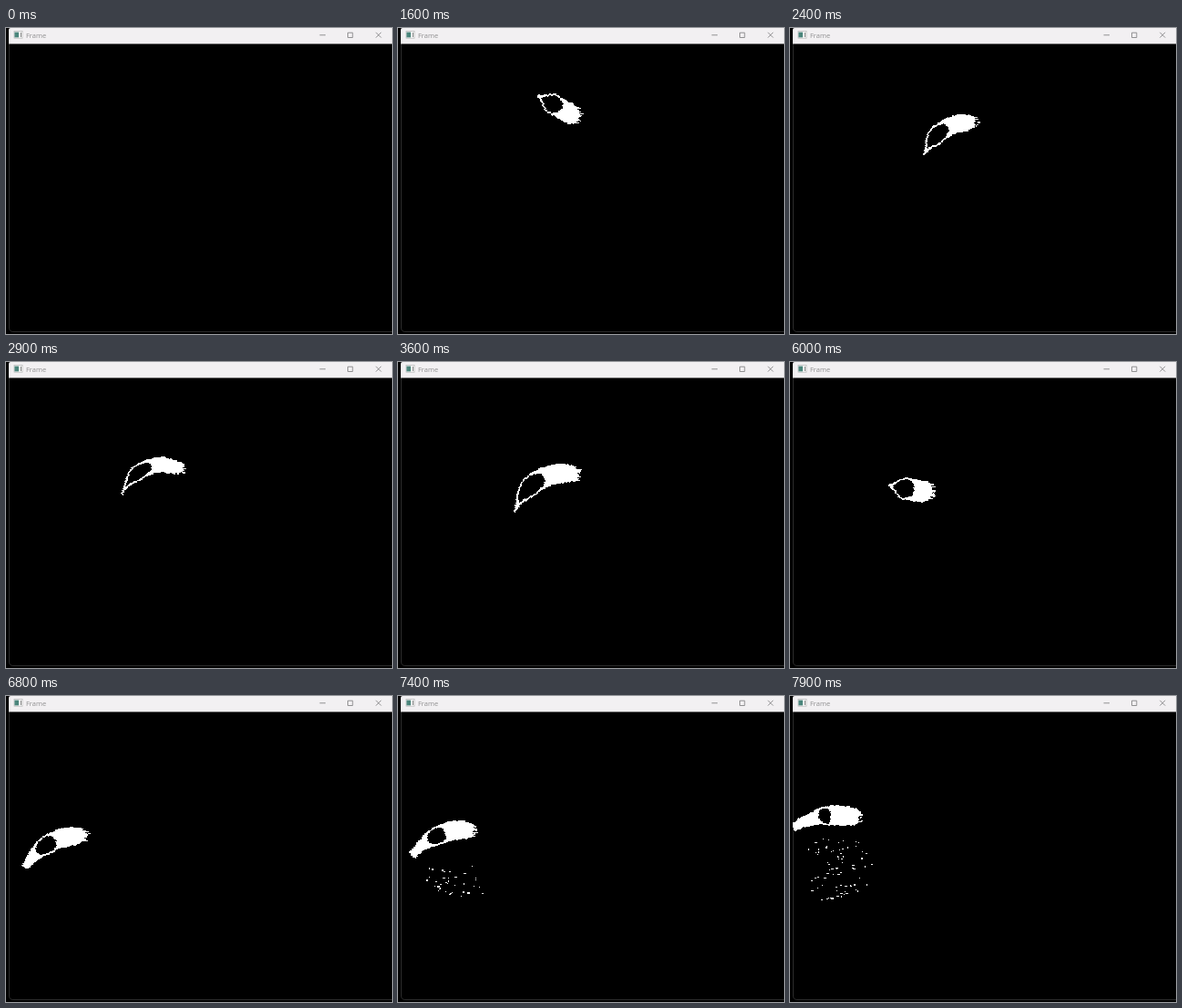
An HTML page with a canvas that plays this animation: 424 px wide and 337 px high, repeating every 8000 ms.

```html
<!DOCTYPE html>
<html lang="en">
<head>
<meta charset="utf-8">
<title>Frame</title>
<style>
  html, body { margin: 0; width: 100%; height: 100%; overflow: hidden; background: #000; }
  svg, canvas { position: absolute; left: 0; top: 0; display: block; }
  text { font: 7.5px "Open Sans", "Noto Sans", sans-serif; fill: #8f8f90; }
  .glyph { fill: none; stroke: #808081; stroke-width: .85; }
</style>
</head>
<body>
<svg width="424" height="337" viewBox="0 0 424 337">
  <path d="M3.5 17V330q0 4.5 4.5 4.5H424" fill="none" stroke="#2c2c2c"/>
  <path d="M3 17.6V2q0-2 2-2H424V17.6Z" fill="#f2f0f2"/>
  <rect x="9" y="3.6" width="9" height="7.6" fill="#f8f8f8" stroke="#b4b6b6" stroke-width=".7"/>
  <rect x="9.4" y="4.6" width="4.6" height="5.8" fill="#4b867c"/>
  <rect x="16" y="5" width="1" height="5" fill="#888"/>
  <text x="22" y="10.6">Frame</text>
  <path class="glyph" d="M344.5 7.8H351M375.5 5.2H380.8V10.5H375.5ZM406.3 4.8L412.1 10.6M412.1 4.8L406.3 10.6"/>
</svg>
<canvas id="mask" width="424" height="337"></canvas>
<script>
const ctx = document.getElementById('mask').getContext('2d');
const LOOP = 8000, STEP = 100, FIRST = 7, SAMPLES = 24;
const held = new Set([9, 21, 23, 43, 44, 49, 57]);

// A comet on a bent spine: tail and head points, bend, half width,
// and neck, the share of the spine over which it widens.
const pose = (step, tx, ty, hx, hy, bend, width, neck = .35) =>
  ({ step, tx, ty, hx, hy, bend, width, neck });
const poses = [
  pose(7, 178, 76, 238, 100, 4, 13),
  pose(16, 153, 74, 199, 100, 0, 11),
  pose(22, 149, 140, 205, 103, 24, 10),
  pose(29, 127, 146, 195, 119, 35, 8.5),
  pose(36, 128, 165, 199, 124, 34, 11),
  pose(45, 152, 136, 195, 125, 9, 11, .3),
  pose(53, 130, 166, 208, 118, 34, 12),
  pose(60, 108, 135, 157, 143, -3, 12),
  pose(68, 21, 189, 88, 154, 23, 10.5, .5),
  pose(79, 3, 145, 77, 135, 16, 11, .65)
];

const clamp = v => Math.max(0, Math.min(1, v));
const smooth = v => { const k = clamp(v); return k * k * (3 - 2 * k); };

function hash(a, b) {
  let h = Math.imul(a + 101, 374761393) ^ Math.imul(b + 57, 668265263);
  h = Math.imul(h ^ (h >>> 13), 1274126177);
  return ((h ^ (h >>> 16)) >>> 0) / 4294967296;
}

function poseAt(step) {
  const i = Math.max(1, poses.findIndex(p => p.step >= step));
  const a = poses[i - 1], b = poses[i];
  const k = ((step - a.step) / (b.step - a.step)) ** 2;
  const p = {};
  for (const key in a) p[key] = a[key] + (b[key] - a[key]) * k;
  return p;
}

// Point on the spine at share s, moved sideways by off.
function spinePoint(p, s, off) {
  const dx = p.hx - p.tx, dy = p.hy - p.ty, len = Math.hypot(dx, dy);
  const cx = (p.tx + p.hx) / 2 + dy / len * p.bend;
  const cy = (p.ty + p.hy) / 2 - dx / len * p.bend;
  const r = 1 - s;
  const vx = r * (cx - p.tx) + s * (p.hx - cx);
  const vy = r * (cy - p.ty) + s * (p.hy - cy);
  const v = Math.hypot(vx, vy);
  return [
    r * r * p.tx + 2 * r * s * cx + s * s * p.hx + vy / v * off,
    r * r * p.ty + 2 * r * s * cy + s * s * p.hy - vx / v * off
  ];
}

function halfWidth(p, s) {
  const tail = Math.min(.42, .1 + 3 * Math.max(0, p.neck - .35));
  const cap = Math.sqrt(1 - .75 * clamp((s - .75) / .25) ** 2);
  return p.width * (tail + (1 - tail) * smooth(s / p.neck)) * cap;
}

// Closed band along the spine; width(s, k) is its half width.
function band(p, from, to, width) {
  const pts = [];
  for (const side of [1, -1]) {
    for (let i = 0; i <= SAMPLES; i++) {
      const k = (side > 0 ? i : SAMPLES - i) / SAMPLES;
      const s = from + (to - from) * k;
      pts.push(spinePoint(p, s, side * width(s, k)));
    }
  }
  const path = new Path2D();
  pts.forEach(([x, y]) => path.lineTo(x, y));
  path.closePath();
  return { path, xs: pts.map(q => q[0]), ys: pts.map(q => q[1]) };
}

function drawComet(p, step) {
  const body = band(p, 0, 1, s => halfWidth(p, s));
  const hollow = band(p, p.neck - .25, .58, (s, k) =>
    Math.max(0, halfWidth(p, s) - 1.8) * Math.sqrt(1 - Math.abs(2 * k - 1) ** 3));
  const left = Math.max(3, Math.floor(Math.min(...body.xs)) - 2);
  const right = Math.max(...body.xs);
  const top = Math.floor(Math.min(...body.ys)) - 2, bottom = Math.max(...body.ys);
  for (let y = top; y < bottom + 2; y++) {
    for (let x = left; x < right + 3; x++) {
      // Rows fray towards the head.
      const fray = 1.6 + 5 * clamp((x - right + 12) / 12);
      const px = x + .5 + (hash(y, step) - .5) * fray;
      const py = y + .5 + (hash(x >> 1, step + 300) - .5) * 1.5;
      if (ctx.isPointInPath(body.path, px, py) && !ctx.isPointInPath(hollow.path, px, py)) {
        ctx.fillRect(x, y, 1, 1);
      }
    }
  }
  return { left, right, bottom };
}

function scatter(count, x, y, w, h, seed) {
  for (let i = 0; i < count; i++) {
    const rnd = salt => hash(i + salt * 97, seed);
    ctx.fillRect(
      Math.floor(x + (rnd(1) * 2 + rnd(2)) / 3 * w), Math.floor(y + rnd(3) * h),
      1 + Math.floor(rnd(4) ** 2 * 3), rnd(5) > .75 ? 2 : 1);
  }
}

function drawStep(step) {
  const p = poseAt(step), box = drawComet(p, step);
  scatter(5, p.hx - 3, p.hy - p.width / 2, 6, p.width, step + 700);
  const count = 16 * clamp((12 - step) / 5) + 75 * clamp((step - 69) / 10);
  scatter(Math.round(count), box.left + 5, box.bottom + 8,
    box.right - box.left + 10, count * .9, step + 500);
}

let shown = -1;
function draw() {
  let step = Math.floor((performance.now() - start) % LOOP / STEP);
  while (held.has(step)) step--;
  if (step !== shown) {
    shown = step;
    ctx.clearRect(0, 0, 424, 337);
    ctx.fillStyle = '#fff';
    if (step >= FIRST) drawStep(step);
  }
  requestAnimationFrame(draw);
}
const start = performance.now();
draw();
</script>
</body>
</html>
```
